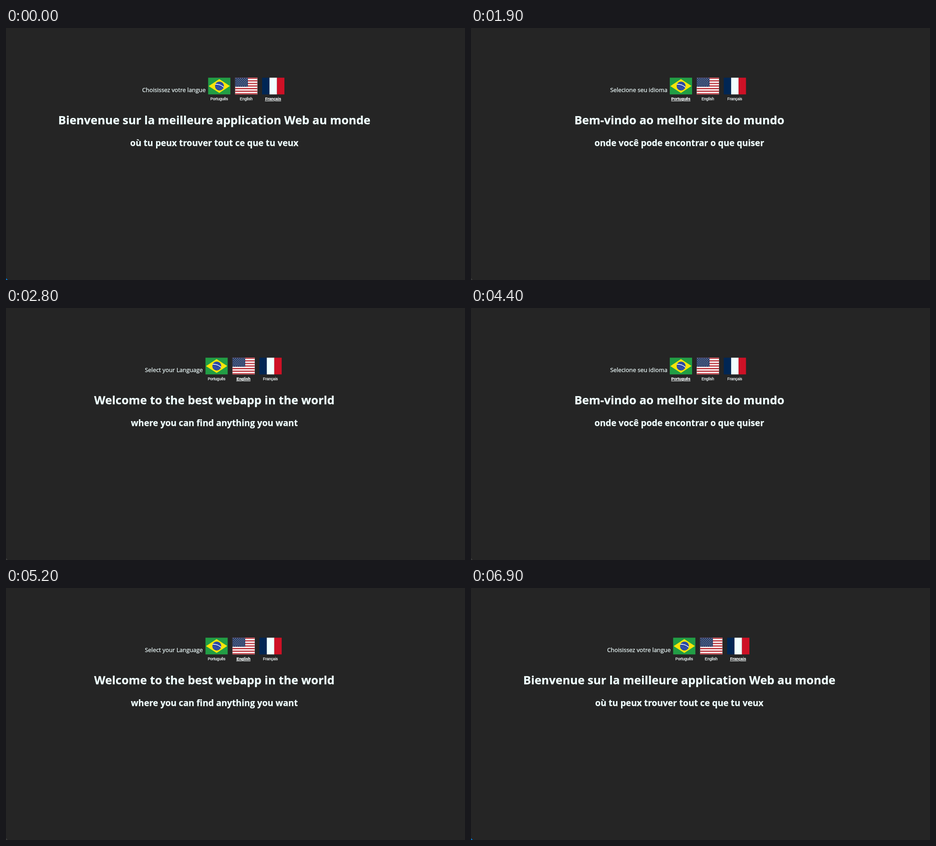
An HTML page that plays this animation: 1009 px wide and 555 px high, repeating every 7 s.

```html
<!DOCTYPE html>
<html lang="en">
<head>
<meta charset="utf-8">
<title>Language switcher</title>
<style>
  html, body { margin: 0; width: 100%; height: 100%; overflow: hidden; background: #252525; }
  #stage { display: block; width: 1009px; height: 555px; }
  text { text-anchor: middle; fill: azure; stroke: azure; stroke-width: .25px; font-family: "Open Sans", "Noto Sans", sans-serif; }
  #prompt { font-size: 12.85px; }
  #title { font-size: 25.5px; font-weight: 700; }
  #subtitle { font-size: 19.2px; font-weight: 700; }
  .label { font: 8.5px "Liberation Sans", Arial, sans-serif; fill: #fff; }
  .label.active { font-weight: 700; text-decoration: underline; }
</style>
</head>
<body>
<svg id="stage" viewBox="0 0 1009 555">
  <rect width="1009" height="555" fill="#252525"/>
  <text id="prompt" x="369" y="141"></text>
  <g id="picker">
    <svg width="49.3" height="37.2" viewBox="0 0 640 480" preserveAspectRatio="none">
      <path fill="#229e45" d="M0 0h640v480H0z"/>
      <path fill="#f8e509" d="M321 436 623 240 320 44 17 241z"/>
      <circle cx="325" cy="240" r="127" fill="#2b49a3"/>
      <path fill="#fff" d="M444 286a125 125 0 0 0 6-20c-68-59-143-90-239-84a125 125 0 0 0-8 21c113-11 196 39 241 83z"/>
      <path stroke="#fff" stroke-width="9" stroke-linecap="round" opacity=".7" d="M240 260h0M262 295h0M290 268h0M318 300h0M345 335h0M372 290h0M395 318h0M340 190h0"/>
    </svg>
    <svg x="59.3" width="49.3" height="37.2" viewBox="0 0 640 480" preserveAspectRatio="none">
      <path fill="#fff" d="M0 0h640v480H0z"/>
      <path id="stripes" fill="#bd3d44"/>
      <path fill="#192f5d" d="M0 0h364.8v258.5H0z"/>
      <path id="stars" stroke="#fff" stroke-width="18" stroke-linecap="round"/>
    </svg>
    <svg x="118.6" width="49.3" height="37.2" viewBox="0 0 3 2" preserveAspectRatio="none">
      <path fill="#002654" d="M0 0h1v2H0z"/>
      <path fill="azure" d="M1 0h1v2H1z"/>
      <path fill="#ce1126" d="M2 0h1v2H2z"/>
    </svg>
    <text class="label" x="24.5" y="50">Português</text>
    <text class="label" x="83.8" y="50">English</text>
    <text class="label" x="143" y="50">Français</text>
  </g>
  <text id="title" x="458" y="212"></text>
  <text id="subtitle" x="458" y="260"></text>
  <path id="corner" d="M0 551 4 555H0z"/>
</svg>
<script>
const $ = id => document.getElementById(id);
const labels = document.querySelectorAll('.label');

const PT = { index: 0, x: 436.8, prompt: 'Selecione seu idioma',
  title: 'Bem-vindo ao melhor site do mundo',
  subtitle: 'onde você pode encontrar o que quiser' };
const EN = { index: 1, x: 438.3, prompt: 'Select your Language',
  title: 'Welcome to the best webapp in the world',
  subtitle: 'where you can find anything you want' };
const FR = { index: 2, x: 444.2, prompt: 'Choisissez votre langue',
  title: 'Bienvenue sur la meilleure application Web au monde',
  subtitle: 'où tu peux trouver tout ce que tu veux' };

const LOOP = 7000;
const schedule = [[0, FR], [1900, PT], [2800, EN], [3500, FR], [4400, PT], [5200, EN], [6000, FR]];

// Seven red stripes, and nine staggered rows of six or five stars
let stripes = '', stars = '';
for (let i = 0; i < 7; i++) stripes += `M0 ${i * 2 * 480 / 13}h640v${480 / 13}H0z`;
for (let row = 0; row < 9; row++)
  for (let col = 0; col < 6 - row % 2; col++)
    stars += `M${30.4 + 30.4 * (row % 2) + 60.8 * col} ${25.85 * (row + 1)}h0`;
$('stripes').setAttribute('d', stripes);
$('stars').setAttribute('d', stars);

let shown;
function show(lang) {
  if (lang === shown) return;
  shown = lang;
  for (const id of ['prompt', 'title', 'subtitle']) $(id).textContent = lang[id];
  $('picker').setAttribute('transform', `translate(${lang.x} 109.2)`);
  labels.forEach((label, i) => label.classList.toggle('active', i === lang.index));
}

function draw(now) {
  const t = now % LOOP;
  show(schedule.findLast(([start]) => start <= t)[1]);
  $('corner').setAttribute('fill', t < 1800 || t >= 6900 ? '#0078d4' : '#3c3c3c');
}

const start = performance.now();
function tick() {
  draw(performance.now() - start);
  requestAnimationFrame(tick);
}
tick();
</script>
</body>
</html>
```
